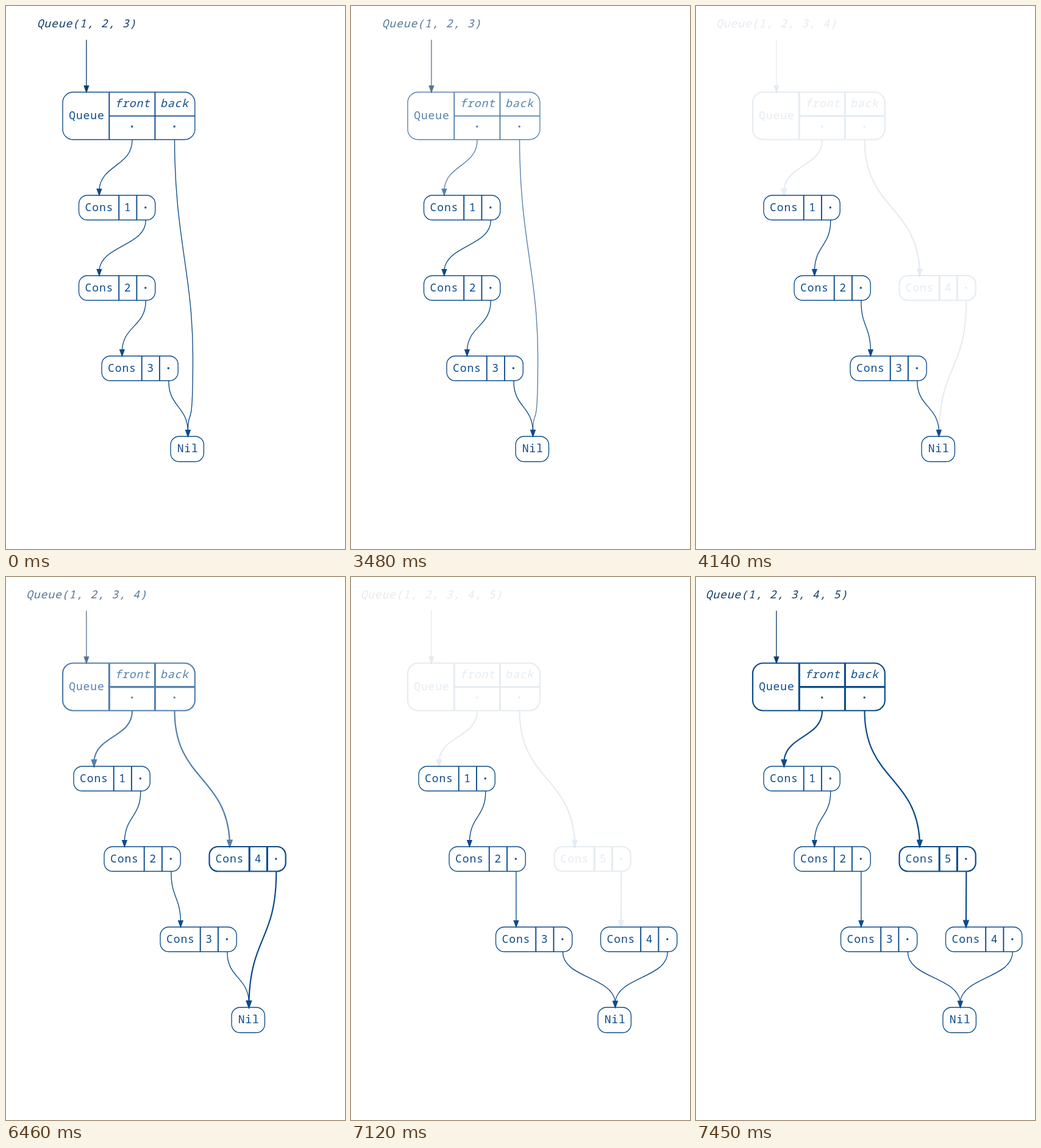
An HTML page that plays this animation: 556 by 892 pixels, repeating every 8000 ms.

```html
<!DOCTYPE html>
<html lang="en">
<head>
<meta charset="utf-8">
<title>Queue</title>
<style>
  html, body { margin: 0; width: 100%; height: 100%; overflow: hidden; background: #fff; }
  svg { display: block; width: 100%; height: 100%; --ink: #0c4b8a; }
  path, rect { fill: none; stroke: var(--ink); }
  text, circle, .head { fill: var(--ink); }
  text { font: 18px "Noto Sans Mono", monospace; letter-spacing: .87px; text-anchor: middle; white-space: pre; }
  .it { font-style: italic; }
  .caption { --ink: #103c68; }
</style>
</head>
<body>
<svg id="stage" viewBox="0 0 556 892"></svg>
<script>
const LOOP = 8000, STEP = 110;
const STARTS = [3480, 6460];
const THIN = 1.35, THICK = 2.2;
const ROW = [311, 443, 575, 707];
const FRONT = 207, BACK = 276.5;

// Each state: node positions, chain links, and the pen width of the newest parts.
const STATES = [
  { nodes: { 1: [119.5, ROW[0]], 2: [119.5, ROW[1]], 3: [157, ROW[2]], Nil: [270, ROW[3]] },
    back: 'Nil', fresh: '', pen: THIN },
  { nodes: { 1: [111, ROW[0]], 2: [161, ROW[1]], 3: [253, ROW[2]], 4: [333.5, ROW[1]], Nil: [370, ROW[3]] },
    back: '4', fresh: '4', pen: THICK },
  { nodes: { 1: [111, ROW[0]], 2: [161, ROW[1]], 3: [237.5, ROW[2]], 4: [409.5, ROW[2]], 5: [333.5, ROW[1]], Nil: [405, ROW[3]] },
    back: '5', fresh: '5', pen: THICK }
];
const NEXT = { 1: '2', 2: '3', 3: 'Nil', 4: 'Nil', 5: '4' };

const clamp = v => Math.min(1, Math.max(0, v));
const lerp = (a, b, p) => a + (b - a) * p;
const text = (x, y, s, cls = '') => `<text x="${x}" y="${y}" class="${cls}">${s}</text>`;
const dot = (x, y) => `<circle cx="${x}" cy="${y}" r="1.7"/>`;
const line = (d, w) => `<path d="${d}" stroke-width="${w}"/>`;
const box = (x, y, w, h, r, pen) =>
  `<rect x="${x}" y="${y}" width="${w}" height="${h}" rx="${r}" stroke-width="${pen}"/>`;
const group = (opacity, body, cls = '') =>
  opacity > 0 ? `<g opacity="${opacity}" class="${cls}">${body}</g>` : '';
const head = (x, y, w) =>
  `<path class="head" d="M${x - 3.7} ${y - 10.4}h7.4L${x} ${y}z" stroke-width="${w}"/>`;

function node(name, [x, y], pen) {
  if (name === 'Nil') return box(x, y, 54.4, 41.5, 14, pen) + text(x + 28.2, y + 26, 'Nil');
  return box(x, y, 125.2, 40.5, 14, pen)
    + line(`M${x + 65.7} ${y}v40.5M${x + 94.9} ${y}v40.5`, pen * 1.4)
    + text(x + 33.4, y + 26, 'Cons') + text(x + 80.2, y + 26, name)
    + dot(x + 109.3, y + 20);
}

const entry = (name, [x, y]) => [x + (name === 'Nil' ? 28.4 : 33.4), y];
const exit = ([x, y]) => [x + 109.8, y + 40.5];

function edge([x1, y1], [x2, y2], pen) {
  const end = y2 - 10, h = end - y1;
  return line(`M${x1} ${y1}C${x1} ${y1 + .53 * h} ${x2 + .07 * (x1 - x2)} ${end - .5 * h} ${x2} ${end}`, pen)
    + head(x2, y2, pen);
}

// Passes around the chain on its way down to the empty list.
function longEdge([x, y], pen) {
  return line(`M${BACK} 220C${BACK} 380 306.5 440 306.5 576S${x + 1} 653 ${x} ${y - 10}`, pen) + head(x, y, pen);
}

function queue({ nodes, back, pen }) {
  const target = entry(back, nodes[back]);
  return box(93, 141.5, 216.8, 78, 17, pen)
    + line('M169.3 141.5v78M244.4 141.5v78M169.3 180.6h140.5', pen * 1.4)
    + text(132.4, 186, 'Queue') + text(207.6, 165.5, 'front', 'it') + text(276.4, 165.5, 'back', 'it')
    + dot(206.7, 198) + dot(276.2, 198)
    + edge([FRONT, 220], entry('1', nodes[1]), pen)
    + (back === 'Nil' ? longEdge(target, pen) : edge([BACK, 220], target, pen));
}

function caption({ nodes }) {
  const items = Object.keys(nodes).filter(n => n !== 'Nil').join(', ');
  return text(132.4, 34.5, `Queue(${items})`, 'it')
    + line('M131.9 55.5V132', THIN) + head(131.9, 141.5, THIN);
}

const frame = (state, opacity) =>
  group(opacity, caption(state), 'caption') + group(opacity, queue(state));

// Phase runs 0 to 3: fade out, move, fade in.
function draw(from, to, phase) {
  const move = clamp(phase - 1), appear = clamp(phase - 2);
  const place = n => from.nodes[n]
    ? from.nodes[n].map((v, i) => lerp(v, to.nodes[n][i], move))
    : to.nodes[n];
  const penOf = n => lerp(n === from.fresh ? from.pen : THIN, n === to.fresh ? to.pen : THIN,
    from.nodes[n] ? move : 1);
  const part = n => {
    const next = NEXT[n];
    return node(n, place(n), penOf(n))
      + (next ? edge(exit(place(n)), entry(next, place(next)), penOf(n)) : '');
  };
  const names = Object.keys(to.nodes);
  const added = names.filter(n => !from.nodes[n]);
  const kept = names.filter(n => from.nodes[n]);
  return frame(from, 1 - clamp(phase)) + frame(to, appear)
    + group(appear, added.map(part).join(''))
    + kept.map(part).join('');
}

const stage = document.getElementById('stage');
let shown = '';

function tick() {
  const t = performance.now() % LOOP;
  const i = t < STARTS[1] ? 0 : 1;
  const steps = Math.min(10, Math.max(0, Math.floor((t - STARTS[i]) / STEP) + 1));
  const key = `${i}:${steps}`;
  if (key !== shown) {
    shown = key;
    stage.innerHTML = draw(STATES[i], STATES[i + 1], steps * 3 / 10);
  }
  requestAnimationFrame(tick);
}
tick();
</script>
</body>
</html>
```
